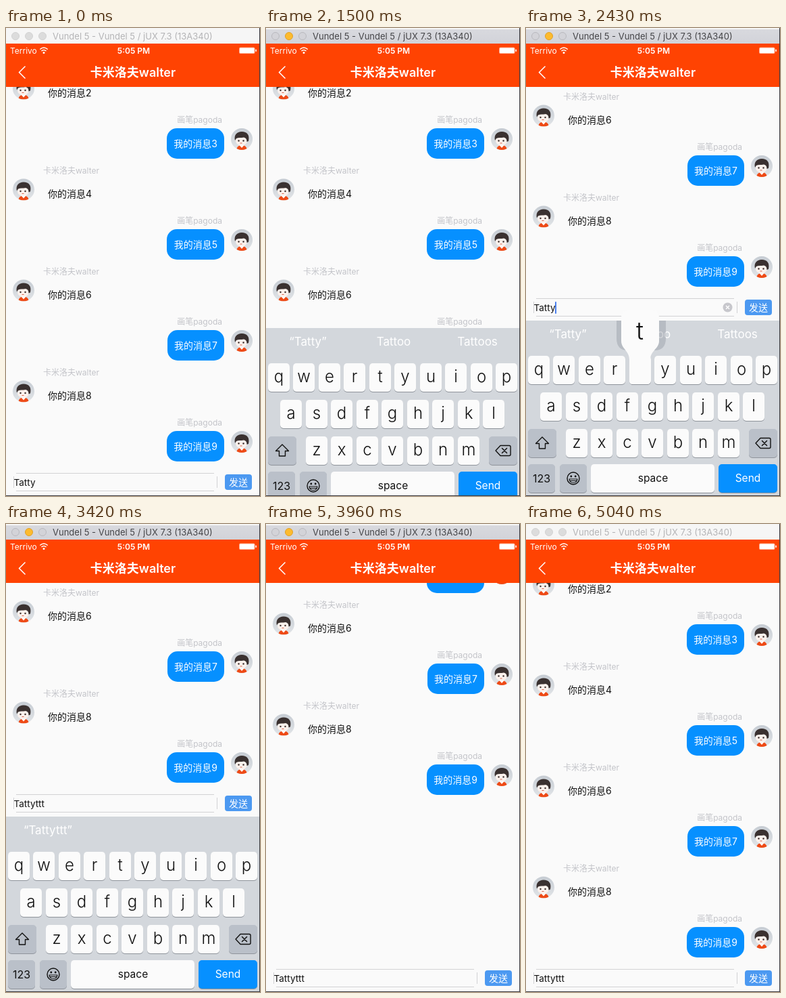
An HTML page for the animation above (5130 ms loop, 376 by 691 pixels).

```html
<!DOCTYPE html>
<html lang="zh">
<head>
<meta charset="utf-8">
<title>Chat keyboard</title>
<style>
html, body { margin: 0; width: 100%; height: 100%; overflow: hidden; background: #33333a; }
svg { display: block; width: 376px; height: 691px; }
text { font-family: Inter, "Noto Sans CJK SC", "Noto Sans CJK", sans-serif; white-space: pre; }
</style>
</head>
<body>
<svg id="stage" viewBox="0 0 376 691">
  <defs>
    <linearGradient id="disc" x1="0" y1="0" x2="0" y2="1">
      <stop offset="0" stop-color="#c6ccd3"/><stop offset="1" stop-color="#e2e5e8"/>
    </linearGradient>
    <linearGradient id="chrome" x1="0" y1="0" x2="0" y2="1">
      <stop offset="0" stop-color="#d8d9de"/><stop offset="1" stop-color="#d2d3d9"/>
    </linearGradient>
    <clipPath id="round"><circle r="16"/></clipPath>
    <g id="avatar">
      <circle r="16" fill="url(#disc)"/>
      <g clip-path="url(#round)">
        <path d="M-8 16Q-7 9 0 9Q7 9 8 16Z" fill="#ee4a16"/>
        <path d="M-4 8.500L0 13L4 8.500Z" fill="#fff"/>
        <ellipse cx="-.5" cy="2.500" rx="8.500" ry="7" fill="#fbf1ec"/>
        <path d="M-10 2C-12 -6 -7 -11 0 -11C8 -11 12 -6 10 3L7.500 4C7.500 0 6 -2 3 -2.500C-1 -1.500 -5 -2.500 -8 -1Z" fill="#3a3130"/>
        <circle cx="-4.500" cy="2.500" r="1.200" fill="#3a2c2a"/><circle cx="2.500" cy="2.500" r="1.200" fill="#3a2c2a"/>
        <path d="M-2.500 6H.5" stroke="#d9644c"/>
      </g>
    </g>
  </defs>
  <rect y="23" width="375" height="667" fill="#fafafa"/>
  <g id="list"></g>
  <g id="bar"></g>
  <g id="keyboard"></g>
  <g id="nav"></g>
  <g id="chromeBar"></g>
  <path d="M375.500 20V691M0 690.500H376" stroke="#3c3c42"/>
</svg>
<script>
const LOOP = 5130, STEP = 30, LIFT = 258;
const PEER = "卡米洛夫walter", SELF = "画笔pagoda";
const $ = id => document.getElementById(id);

function add(parent, tag, attrs, text) {
  const el = document.createElementNS("http://www.w3.org/2000/svg", tag);
  for (const k in attrs) el.setAttribute(k, attrs[k]);
  if (text !== undefined) el.textContent = text;
  parent.appendChild(el);
  return el;
}
const box = (p, x, y, width, height, rx, fill, more) =>
  add(p, "rect", { x, y, width, height, rx, fill, ...more });
const line = (p, d, stroke, w = 1, more) =>
  add(p, "path", { d, stroke, fill: "none", "stroke-width": w, ...more });
const label = (p, s, x, y, size, fill, more) =>
  add(p, "text", { x, y, "font-size": size, fill, ...more }, s);
const mid = { "text-anchor": "middle" }, end = { "text-anchor": "end" };
const light = { ...mid, "font-weight": 300 };
const move = (el, y) => el.setAttribute("transform", `translate(0 ${Math.round(y)})`);
const show = (el, on) => el.setAttribute("opacity", +on);

// Messages
const list = $("list");
for (let n = 2; n <= 9; n++) {
  const y = 96 + (n - 2) * 74.5, mine = n % 2;
  add(list, "use", { href: "#avatar", x: mine ? 349 : 26, y: y - 6.5 });
  if (mine) {
    const left = n === 7 ? 239 : 238;
    label(list, SELF, 320, y - 30.5, 12, "#c3c4c9", end);
    box(list, left, Math.round(y - 22.6), 323 - left, 45, 15, "#0690ff");
    label(list, "我的消息" + n, 313, y + 5, 14, "#fff", end);
  } else {
    label(list, PEER, 55, y - 30.5, 12, "#c3c4c9");
    label(list, "你的消息" + n, 62, y + 5, 14, "#111");
  }
}

// Input bar
const bar = $("bar");
box(bar, 0, 651, 375, 300, 0, "#fafafa");
line(bar, "M15 657.5H308M15 683.5H308M11.5 662V679M312.5 662V679", "#d2d2d4");
const field = label(bar, "Tatty", 11.5, 675.5, 13.5, "#111");
box(bar, 324, 659, 40, 23, 4, "#4c99f1");
label(bar, "发送", 344, 676, 14, "#fff", mid);
const focus = add(bar, "g", {});
const caret = box(focus, 44, 662, 2, 18, 1, "#4a80ee");
add(focus, "circle", { cx: 298.5, cy: 670.5, r: 7, fill: "#c7c7cc" });
line(focus, "M296 668L301 673M301 668L296 673", "#fff", 1.4);

// Keyboard, drawn in its raised place
const kb = $("keyboard");
box(kb, 0, 432, 375, 260, 0, "#d3d7dc");
const hints = [62, 189, 313].map(x => label(kb, "", x, 457.5, 17, "#fff", mid));
function key(x, y, w, fill = "#fbfbfb") {
  box(kb, x, y + 1, w, 42, 5, "#8f949b");
  box(kb, x, y, w, 42, 5, fill);
}
["qwertyuiop", "asdfghjkl", "zxcvbnm"].forEach((row, r) => {
  const y = 484 + r * 54, x0 = [18.75, 37.25, 74.5][r];
  [...row].forEach((c, i) => {
    const x = Math.round(x0 - 16 + i * 37.5);
    key(x, y, 32);
    label(kb, c, x + 16, y + 27.5, 24, "#111", light);
  });
});
const GREY = "#bac0c9";
key(3, 592, 42, GREY);
key(330, 592, 42, GREY);
key(3, 644, 40, GREY);
key(50, 644, 40, GREY);
key(96, 644, 183);
key(285, 644, 87, "#0690ff");
const joined = { "stroke-linejoin": "round", "stroke-linecap": "round" };
line(kb, "M24 604L33.500 613.500H28.500V621H19.500V613.500H14.500Z", "#111", 1.4, joined);
line(kb, "M347 605.500H360Q362 605.500 362 607.500V618.500Q362 620.500 360 620.500H347L340 613Z", "#111", 1.4, joined);
line(kb, "M349.500 609.500L356.500 616.500M356.500 609.500L349.500 616.500", "#111", 1.5, joined);
add(kb, "circle", { cx: 70, cy: 665, r: 9, fill: "none", stroke: "#111", "stroke-width": 1.4 });
add(kb, "circle", { cx: 66.8, cy: 662, r: 1.4, fill: "#111" });
add(kb, "circle", { cx: 73.2, cy: 662, r: 1.4, fill: "#111" });
line(kb, "M64 666H76Q75 671.500 70 671.500Q65 671.500 64 666ZM65 668.500H75", "#111", 1.2, joined);
label(kb, "123", 23, 671, 16, "#111", mid);
label(kb, "space", 188, 669.5, 15.5, "#111", mid);
label(kb, "Send", 328.5, 670, 15.5, "#fff", mid);

const popup = add(kb, "g", {});
add(popup, "path", { d: "M134 432H207V458Q207 476 190 476H151Q134 476 134 458Z", fill: "#888e98", opacity: .38 });
add(popup, "path", {
  d: "M141 427q0 -10 10 -10h36q10 0 10 10V462C197 474 184 476 184 490V521q0 5 -5 5h-21q-5 0 -5 -5V490C153 476 141 474 141 462Z",
  fill: "#fbfbfb"
});
line(popup, "M156 526.5H181", "#8f949b");
label(popup, "t", 168.5, 460, 37, "#111", light);

// Status and navigation
const nav = $("nav");
box(nav, 0, 23, 375, 64, 0, "#ff4302");
label(nav, "Terrivo", 6, 37.5, 12, "#fff");
add(nav, "circle", { cx: 56, cy: 36.5, r: 1.5, fill: "#fff" });
line(nav, "M50.300 31.500Q56 26.500 61.700 31.500M52.500 34Q56 31 59.500 34", "#fff", 1.6);
label(nav, "5:05 PM", 189, 37.5, 12, "#fff", { ...mid, "font-weight": 600 });
box(nav, 345, 28.5, 23.5, 9.5, 2, "#fff", { opacity: .55 });
box(nav, 346, 29.5, 21.5, 7.5, 1, "#fff");
box(nav, 369.3, 31.5, 1.5, 3.5, .7, "#fff");
line(nav, "M28.500 56.500L19.500 65.500L28.500 74.500", "#fff", 1.5);
label(nav, PEER, 188, 72, 18, "#fff", { ...mid, "font-weight": 600 });

// Window title: the active look lies over the resting one
function chrome(top, fill, ink, dots, edge) {
  const g = add($("chromeBar"), "g", {});
  box(g, 0, top, 375, 23 - top, 0, fill);
  dots.forEach((c, i) =>
    add(g, "circle", { cx: 14 + i * 20, cy: 12, r: 5.5, fill: c, stroke: edge[i], "stroke-width": 1 }));
  label(g, "Vundel 5 - Vundel 5 / jUX 7.3 (13A340)", 69, 17, 13, ink);
  return g;
}
chrome(0, "#f6f6f6", "#b4b4b6", Array(3).fill("#dcdcdc"), Array(3).fill("#d2d2d2"));
const active = chrome(2, "url(#chrome)", "#454548", ["#d3d3d8", "#fdbb2e", "#d3d3d8"], ["#b9b9be", "#e0a028", "#b9b9be"]);

// Timing
const clamp = v => Math.max(0, Math.min(1, v));
const within = (t, a, b) => t >= a && t < b;
const settle = s => 1 - (1 + 15.2 * s) * Math.exp(-15.2 * s);
const spring = (t, start) => settle(clamp((t - start) / 430) * .43) / settle(.43);
const ease = (t, start, dur) => (1 - Math.cos(Math.PI * clamp((t - start) / dur))) / 2;
const count = (t, times) => times.filter(s => t >= s).length;
const TYPED = [2490, 2640, 2790], HINTED = [2550, 2850, 2970];
const PRESSES = [[2280, 2490], [2580, 2640], [2730, 2850]];

function draw(t) {
  show(active, within(t, 1080, 5040));

  move(list, -LIFT * (ease(t, 1700, 325) - ease(t, 3906, 315)));
  move(bar, within(t, 1710, 3930) ? -LIFT : 0);
  move(kb, 259 * (1 - spring(t, 1190) + spring(t, 3440)));
  show(kb, within(t, 1200, 3880));

  field.textContent = "Tatty" + "t".repeat(count(t, TYPED));
  caret.setAttribute("x", 11 + field.getComputedTextLength());
  show(focus, within(t, 1200, 3360));

  const n = count(t, HINTED);
  hints[0].textContent = "“Tatty" + "t".repeat(n) + "”";
  hints[1].textContent = n ? "" : "Tattoo";
  hints[2].textContent = n ? "" : "Tattoos";

  const alpha = PRESSES.map(([a, b]) => t < a ? 0 : clamp(1 - (t - b) / 90));
  show(popup, Math.max(...alpha));
}

const t0 = performance.now();
function tick() {
  const t = (performance.now() - t0) % LOOP;
  draw(Math.floor(t / STEP) * STEP);
  requestAnimationFrame(tick);
}
draw(0);
requestAnimationFrame(tick);
</script>
</body>
</html>
```
